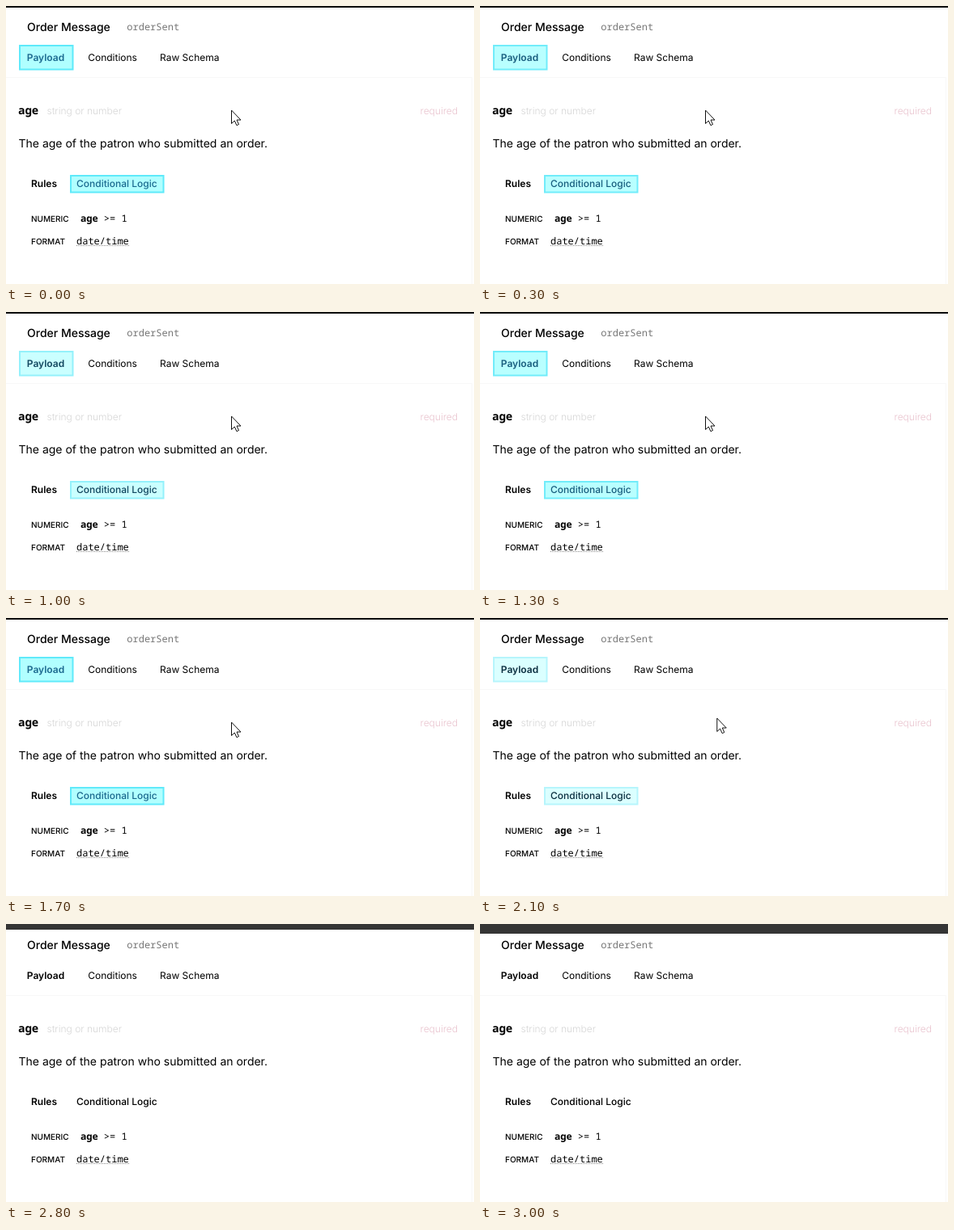
These frames come from a looping animation (578x344 px, 3200 ms). An HTML page:

```html
<!DOCTYPE html>
<html lang="en">
<head>
<meta charset="utf-8">
<title>Order Message</title>
<style>
  html, body { margin: 0; width: 100%; height: 100%; overflow: hidden; background: #fff; }
  svg { display: block; width: 578px; height: 344px; }
  text { font: 12px Inter, sans-serif; fill: #000; white-space: pre; text-rendering: geometricPrecision; }
  .big { font-size: 14px; }
  .small { font-size: 10px; }
  .medium { font-weight: 500; }
  .bold { font-weight: 600; }
  .mono { font-family: "Noto Sans Mono", monospace; }
  .mark rect { fill: #b0ffff; stroke: #5eeafa; stroke-width: 2; }
</style>
</head>
<body>
<svg viewBox="0 0 578 344">
  <rect width="578" height="344" fill="#fff"/>
  <path d="M0 88.5H575.5V344" fill="none" stroke="#f8f8f8"/>
  <g class="mark" id="marks">
    <rect x="17" y="49" width="65.5" height="29.5"/>
    <rect x="80" y="210" width="114.5" height="20.5"/>
  </g>

  <text class="big medium" x="26" y="30.5">Order Message</text>
  <text class="mono" x="149.3" y="29.5" style="fill:#777">orderSent</text>

  <text class="bold tint" x="25.8" y="68.3">Payload</text>
  <text x="101.2" y="68.3">Conditions</text>
  <text x="190" y="68.3">Raw Schema</text>

  <text class="mono big bold" x="15" y="134.3">age</text>
  <text x="50.5" y="134" style="fill:#d6d6d6;font-weight:300">string or number</text>
  <text x="558" y="134" text-anchor="end" style="fill:#e9c3ce;font-weight:300">required</text>
  <text class="big" x="15.5" y="175">The age of the patron who submitted an order.</text>

  <text class="bold" x="31" y="224.3">Rules</text>
  <text class="medium tint" x="87" y="224.3">Conditional Logic</text>

  <text class="small medium" x="31" y="267.3">NUMERIC</text>
  <text class="mono" x="92" y="267.3"><tspan class="bold">age</tspan> &gt;= 1</text>
  <text class="small medium" x="31" y="295.3">FORMAT</text>
  <text class="mono medium" x="87" y="295.3">date/time</text>
  <path d="M87 296.5H152" stroke="#888" stroke-dasharray="1 1"/>

  <path id="cursor" d="M0 0V16.5L3.8 13L6.4 18.7L9 17.5L6.5 12H11.5Z" fill="#fff" stroke="#111" stroke-width="1"/>
  <rect id="bar" width="578" height="2"/>
</svg>
<script>
  const LOOP = 3200, STEP = 100;
  const $ = id => document.getElementById(id);
  const marks = $("marks"), cursor = $("cursor"), bar = $("bar");
  const tinted = document.querySelectorAll(".tint");
  const progress = (t, from, to) => Math.min(1, Math.max(0, (t - from) / (to - from)));

  function draw(t) {
    // Highlights breathe, then fade away.
    const pulse = 0.8 + 0.2 * Math.cos(2 * Math.PI * t / 1600);
    const glow = pulse * (1 - progress(t, 1850, 2500));
    marks.setAttribute("opacity", glow);
    const ink = `rgb(${[27, 106, 144].map(c => Math.round(c * glow))})`;
    tinted.forEach(el => el.style.fill = ink);

    // The pointer speeds off to the right.
    const leave = progress(t, 1900, 2300) ** 3;
    cursor.setAttribute("transform", `translate(${278.5 + 114 * leave} ${129 - 40 * leave})`);
    cursor.style.display = t < 2400 ? "" : "none";

    // The dark bar drops in from the top edge.
    const drop = progress(t, 2600, 3000);
    const shade = Math.round(53 * Math.min(1, drop * 2));
    bar.setAttribute("height", 2 + 10 * drop);
    bar.setAttribute("fill", `rgb(${shade},${shade},${shade})`);
  }

  const start = performance.now();
  function tick() {
    const t = (performance.now() - start) % LOOP;
    draw(Math.floor(t / STEP) * STEP);
    requestAnimationFrame(tick);
  }
  draw(0);
  requestAnimationFrame(tick);
</script>
</body>
</html>
```
